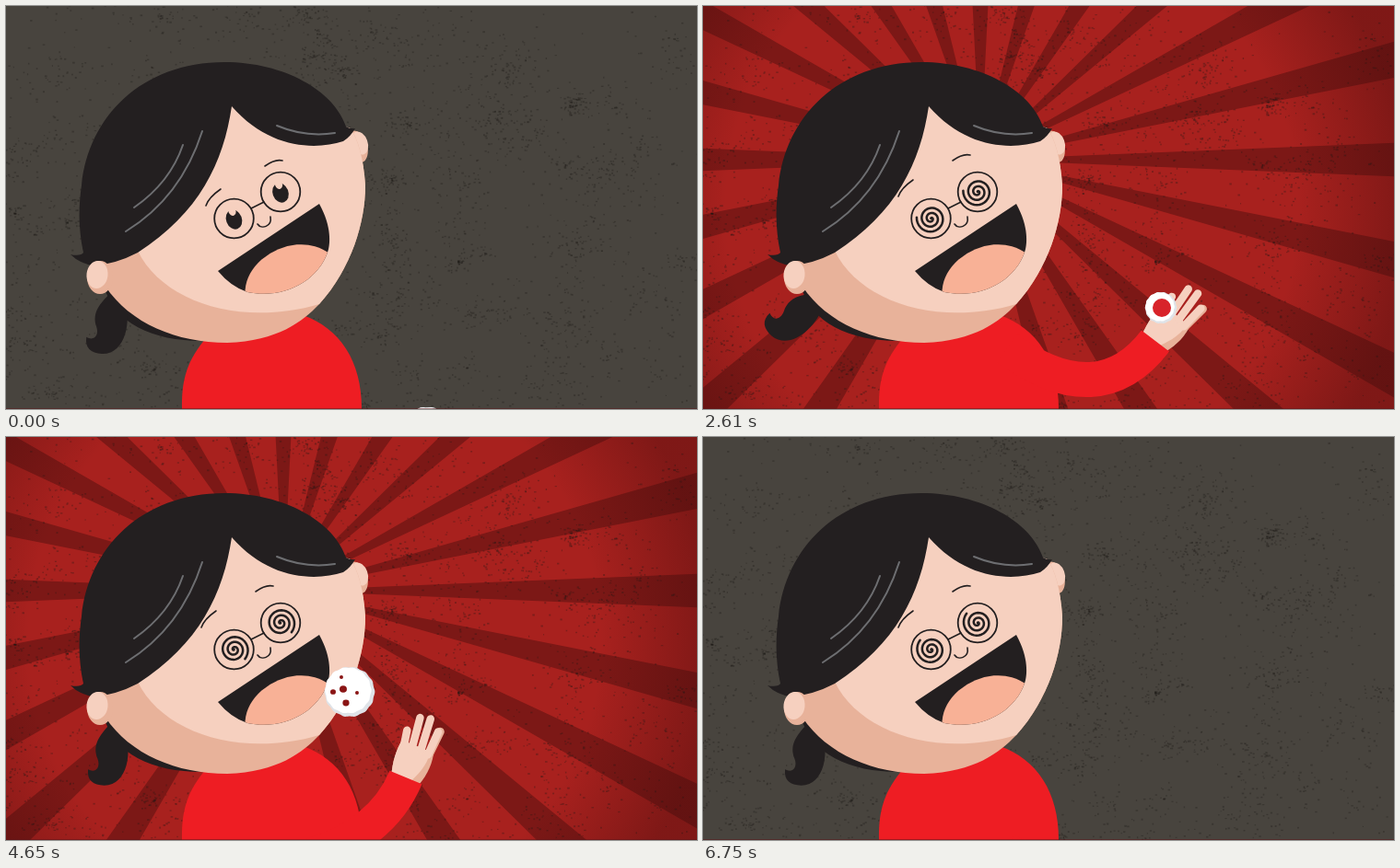
These frames come from a looping animation (750x438 px, 6780 ms). An HTML page with a canvas:

```html
<!DOCTYPE html>
<html lang="en">
<head>
<meta charset="utf-8">
<title>Snack time</title>
<style>
html, body { margin: 0; width: 100%; height: 100%; overflow: hidden; background: #48443e; }
canvas { display: block; }
</style>
</head>
<body>
<canvas id="stage" width="750" height="438"></canvas>
<script>
const W = 750, H = 438, LOOP = 6780, BITE = 600, FIRST = 2400, LAST = 6000;
const INK = '#231f20', SKIN = '#f6d0bf', SHADE = '#e8b29a', RED = '#ee1d23';
const ctx = document.getElementById('stage').getContext('2d');

const clamp = x => Math.max(0, Math.min(1, x));
const mix = (a, b, k) => a + (b - a) * k;
const ramp = (t, a, b) => { const k = clamp((t - a) / (b - a)); return k * k * (3 - 2 * k); };

// keys: [[time, [values]], ...]
function pose(keys, t) {
  let i = 0;
  while (i < keys.length - 2 && t > keys[i + 1][0]) i++;
  const [t0, a] = keys[i], [t1, b] = keys[i + 1], k = ramp(t, t0, t1);
  return a.map((v, j) => mix(v, b[j], k));
}

function fill(d, color) {
  ctx.fillStyle = color;
  ctx.fill(new Path2D(d));
}
function line(d, color, width) {
  ctx.strokeStyle = color;
  ctx.lineWidth = width;
  ctx.stroke(new Path2D(d));
}
function oval(x, y, rx, ry, turn, color) {
  ctx.beginPath();
  ctx.ellipse(x, y, rx, ry, turn, 0, 7);
  ctx.fillStyle = color;
  ctx.fill();
}
function layer(draw) {
  const c = document.createElement('canvas');
  c.width = W;
  c.height = H;
  draw(c.getContext('2d'));
  return c;
}

let seed = 7;
const rand = () => (seed = seed * 16807 % 2147483647) / 2147483647;

const grunge = layer(g => {
  g.fillStyle = 'rgba(30,27,24,.32)';
  for (let i = 0; i < 170; i++) {
    const x = rand() * W, y = rand() * H, spread = 12 + rand() * 45, n = 8 + rand() * 32;
    for (let j = 0; j < n; j++) {
      const a = rand() * 6.28, r = rand() * spread;
      g.fillRect(x + Math.cos(a) * r * 1.3, y + Math.sin(a) * r, 1 + rand() * 1.6, 1 + rand());
    }
  }
});

const burst = layer(g => {
  const cx = 301, cy = 167, stretch = 1.11, step = Math.PI / 12, half = 0.045;
  g.fillStyle = '#a8211e';
  g.fillRect(0, 0, W, H);
  g.fillStyle = '#7c1816';
  for (let i = 0; i < 24; i++) {
    g.beginPath();
    g.moveTo(cx, cy);
    for (const a of [i * step - half, i * step + half])
      g.lineTo(cx + 900 * stretch * Math.cos(a), cy + 900 * Math.sin(a));
    g.fill();
  }
  const v = g.createRadialGradient(335, 219, 310, 335, 219, 430);
  v.addColorStop(0, 'rgba(60,10,10,0)');
  v.addColorStop(1, 'rgba(60,10,10,.38)');
  g.fillStyle = v;
  g.fillRect(0, 0, W, H);
});

function backdrop(t) {
  ctx.fillStyle = '#48443e';
  ctx.fillRect(0, 0, W, H);
  ctx.globalAlpha = clamp((t - 1500) / 840) * (1 - clamp((t - 5860) / 840));
  ctx.drawImage(burst, 0, 0);
  ctx.globalAlpha = 1;
  ctx.drawImage(grunge, 0, 0);
}

// arm: shoulder x y, bend x y, wrist x y, hand angle
const LOW = [330, 450, 400, 480, 440, 510, 25];
const REST = [320, 415, 402, 422, 444, 366, 40];
const HOLD = [330, 372, 430, 444, 491, 364, 41];
const TOSS = [320, 376, 456, 404, 481, 313, 22];
const DROP = [330, 455, 408, 432, 434, 370, 22];
const INTRO = [[0, LOW], [180, DROP], [420, REST], [2160, REST], [FIRST, LOW]];
const CYCLE = [[0, LOW], [210, HOLD], [300, TOSS], [450, DROP], [600, LOW]];

function armAt(t) {
  if (t < FIRST) return pose(INTRO, t);
  return t < LAST ? pose(CYCLE, (t - FIRST) % BITE) : LOW;
}

function arm(a) {
  const [sx, sy, bx, by, wx, wy, turn] = a;
  ctx.save();
  ctx.translate(wx, wy);
  ctx.rotate(turn * Math.PI / 180);
  line('M14 -32L16 -60', SHADE, 9);
  fill('M-15 5C-20 -10 -21 -24 -19 -36L18 -36C22 -20 19 -6 15 5Z', SHADE);
  fill('M-15 5C-20 -10 -21 -24 -19 -36L14 -36C17 -20 10 -6 5 5Z', SKIN);
  line('M-15 -32L-18 -48M-6 -34L-10 -66M4 -34L1 -69M13 -32L14 -59', SKIN, 8.5);
  ctx.restore();
  ctx.lineCap = 'butt';
  line(`M${sx} ${sy}Q${bx} ${by} ${wx} ${wy}`, RED, 38);
  ctx.lineCap = 'round';
}

function ponytail(t) {
  const still = t > 440 && t < 2180;
  const swing = still ? 0 : 27.5 * (1 - Math.cos((t - 20) / 210 * 2 * Math.PI - (t > 2000 ? 2 * Math.PI * 2580 / 210 : 0) + (t > 2000 ? 2 * Math.PI * 2580 / 210 : 0) - (t > 2000 ? 0 : 0)));
  ctx.save();
  ctx.translate(118, 325);
  ctx.rotate(swing * Math.PI / 180);
  ctx.translate(-118, -325);
  fill('M128 318C138 340 134 378 108 379C96 379 89 374 90 362C98 366 104 360 100 350C94 336 101 326 110 315Z', INK);
  ctx.restore();
}

function mouth(t) {
  const chew = t > 480 && t < 2160 ? 0.12 * (1 - Math.cos(t / 240 * 2 * Math.PI)) : 0;
  const open = Math.max(chew, 1 - ramp(t, 330, 480), ramp(t, 2160, 2400));
  const shut = [255, 295, 337, 245, 333, 257, 326, 260, 318, 263, 300, 275, 284, 291, 265, 295];
  const wide = [230, 288, 340, 215, 354, 240, 352, 260, 349, 268, 338, 299, 302, 319, 262, 311];
  const p = shut.map((v, i) => mix(v, wide[i], open));
  const d = `M${p[0]} ${p[1]}L${p[2]} ${p[3]}C${p.slice(4, 10)}C${p.slice(10)}Q${mix(260, 244, open)} ${mix(295, 305, open)} ${p[0]} ${p[1]}Z`;
  fill(d, INK);
  ctx.save();
  ctx.clip(new Path2D(d));
  oval(312, 304, 54, 43, -0.4, '#f8b196');
  ctx.restore();
}

function spiral(x, y, t) {
  const turn = -t / BITE * 2 * Math.PI, size = ramp(t, 2100, 2350);
  ctx.beginPath();
  for (let a = 0; a <= 18; a += 0.2) {
    const r = a * 0.87 * size;
    ctx.lineTo(x + r * Math.cos(a + turn), y + r * Math.sin(a + turn));
  }
  ctx.strokeStyle = INK;
  ctx.lineWidth = 2.5;
  ctx.stroke();
}

function eyes(t) {
  const up = ramp(t, 420, 660);
  for (const [x, y] of [[247.5, 231], [298, 202]]) {
    if (t < 2100) {
      oval(x, y + 1, 8.5, 11, -0.35, INK);
      oval(x + mix(-2, 5, up), y + mix(-8, 7, up), 4, 5, -0.35, SKIN);
    } else spiral(x, y, t);
    ctx.beginPath();
    ctx.arc(x, y, 21.3, 0, 7);
    ctx.strokeStyle = INK;
    ctx.lineWidth = 1.8;
    ctx.stroke();
  }
  line('M266 220L280 213M273 237C277 243 289 240 287 229', INK, 1.6);
  const brow = (d, x, y) => {
    ctx.save();
    ctx.translate(x * up, y * up);
    line(d, INK, 1.6);
    ctx.restore();
  };
  brow('M217 217Q220 208 233 199', -5, -10);
  brow('M281 174Q292 166 300 168', -10, -6);
}

function body() {
  fill('M191 438C190 400 200 380 222 355L322 336C362 350 386 385 386 438Z', RED);
}

function head(t) {
  fill('M106 303C116 345 160 364 212 364L200 335L120 295Z', INK);
  ponytail(t);
  oval(381, 153, 11, 18, -0.3, SHADE);
  oval(384, 149, 8.5, 13, -0.35, SKIN);
  fill('M108 305C135 345 185 366 240 366C295 364 322 343 340 324C375 285 390 235 390 195C388 165 382 145 374 133L245 90L95 275Z', SHADE);
  fill('M143 266C170 322 255 349 340 324C375 285 390 235 390 195C388 165 382 145 374 133L245 90Z', SKIN);
  fill('M70 270C78 272 83 270 84 268C78 240 79 215 82 195C89 121 147 61 237 61C302 61 356 92 369 131Q374 134 379 133Q374 142 366 147C335 157 285 155 245 109C236 170 210 225 143 268Q118 281 95 282Q80 280 70 270Z', INK);
  line('M139 219Q178 192 192 151M130 245Q190 208 213 136M294 130Q325 143 357 138', '#6d6e71', 2);
  oval(102, 295, 14, 18, 0, SHADE);
  oval(99, 292, 11.5, 15, 0.1, SKIN);
  eyes(t);
  mouth(t);
}

function ball(x, y, r, wrapped) {
  const disc = (dx, size, color) => {
    ctx.beginPath();
    for (let a = 0; a < 6.28; a += 0.05) {
      const q = r * size * (1 + 0.015 * Math.cos(14 * a));
      ctx.lineTo(x + dx * r + q * Math.cos(a), y + dx * r + q * Math.sin(a));
    }
    ctx.fillStyle = color;
    ctx.fill();
  };
  disc(0, 1, '#dfe3e8');
  disc(-0.06, 0.92, '#fff');
  if (wrapped) return oval(x + 1, y, 10, 10, 0, '#d8232a');
  const k = (r / 27) ** 2;
  for (const [dx, dy, s] of [[-9, -16, 2], [-18, 0, 3], [-7, -3, 4], [8, 1, 2], [-4, 12, 3.6]])
    oval(x + dx * k, y + dy * k, s * k, s * k * 0.95, 0, '#8a1515');
}

// x, y, radius on the way to the mouth
const THROWN = [[215, [497, 328, 17]], [300, [352, 241, 24]], [390, [300, 274, 10]]];
const SCOOPED = [[220, [452, 500, 29]], [270, [457, 465, 29]], [300, [466, 440, 29]], [450, [373, 277, 27]], [540, [305, 285, 10]]];

function balls(t, a) {
  if (t < 270) return ball(...pose(SCOOPED, t + 270));
  if (t < FIRST || t >= LAST) return;
  const p = (t - FIRST) % BITE;
  if (p < 215) ball(a[4] + 6, a[5] - 36, 17, true);
  else if (p < 390) ball(...pose(THROWN, p));
  if (p > 220 && p < 540) ball(...pose(SCOOPED, p));
}

function frame(now) {
  const t = now % LOOP, a = armAt(t);
  ctx.lineCap = ctx.lineJoin = 'round';
  backdrop(t);
  body();
  arm(a);
  head(t);
  balls(t, a);
  ctx.fillStyle = 'rgba(90,20,25,.5)';
  ctx.fillRect(0, 437, W, 1);
  requestAnimationFrame(frame);
}
requestAnimationFrame(frame);
</script>
</body>
</html>
```
